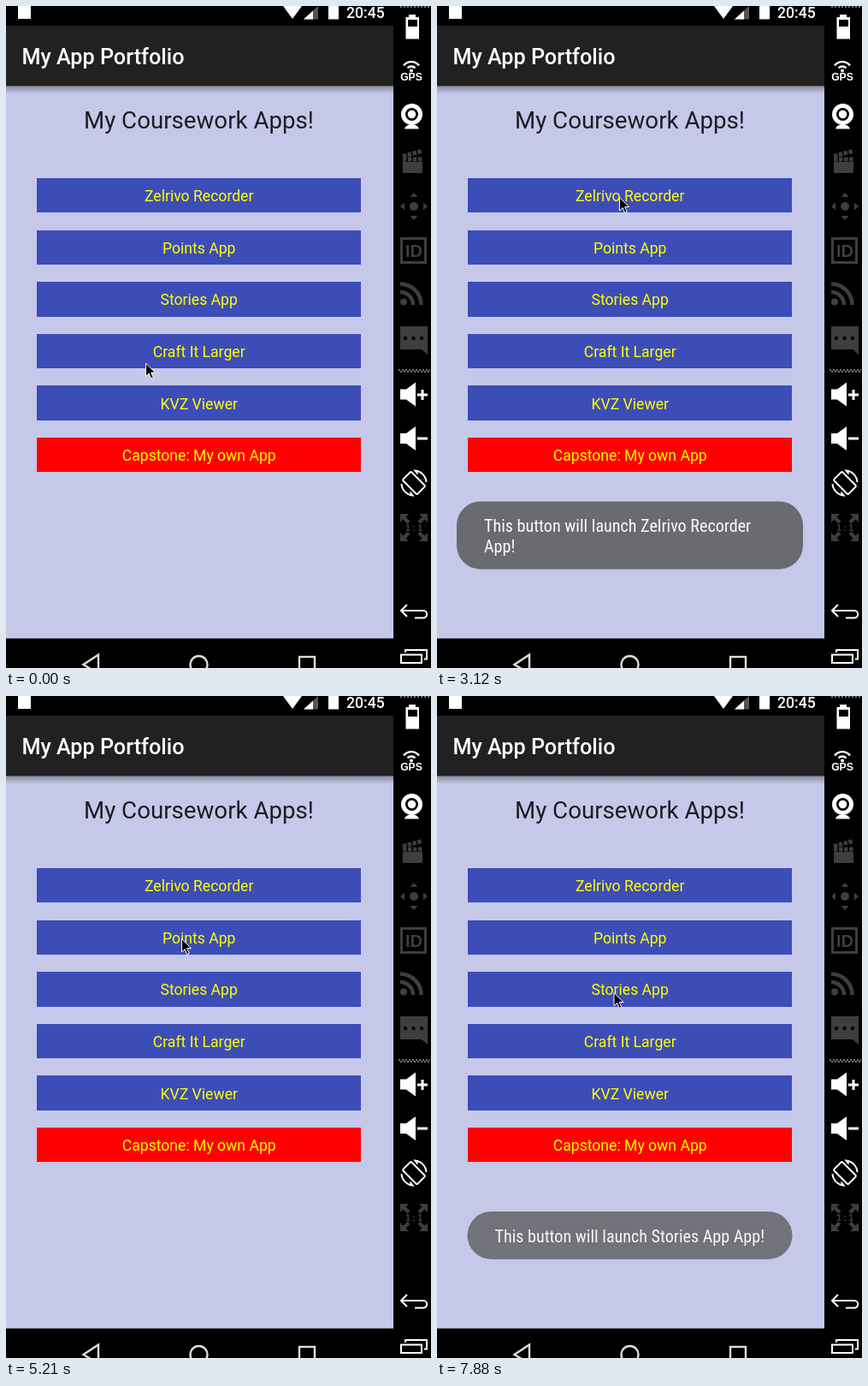
An HTML page that plays this animation: 497 px wide and 773 px high, repeating every 8000 ms.

```html
<!DOCTYPE html>
<html lang="en">
<head>
<meta charset="utf-8">
<title>App portfolio demo</title>
<style>
  html, body { margin: 0; width: 100%; height: 100%; overflow: hidden; background: #000; }
  svg { display: block; font-family: Roboto, sans-serif; }
  .label { font-size: 17.6px; fill: #ff0; text-anchor: middle; }
  .toast rect { fill: #646568; }
  .toast text { font: 20.1px "Roboto Condensed", Roboto, sans-serif; font-stretch: 75%; fill: #fff; }
  .line { fill: none; stroke: #fff; stroke-width: 2.4; }
  .thin { stroke-width: 2; }
  .dim { fill: #3e3e3e; }
  .dimline { fill: none; stroke: #3e3e3e; }
  .bold { font-family: "Liberation Sans", Arial, sans-serif; font-weight: bold; text-anchor: middle; }
</style>
</head>
<body>
<svg width="497" height="773" viewBox="0 0 497 773">
  <defs>
    <linearGradient id="shade" x2="0" y2="1">
      <stop stop-color="#000" stop-opacity=".32"/>
      <stop offset="1" stop-color="#000" stop-opacity="0"/>
    </linearGradient>
    <path id="speaker" d="M461 -6h7l11 -8v28l-11 -8h-7z" fill="#fff"/>
    <path id="corner" d="M-16 -16h10l-3.5 3.5 5 5 -3 3 -5 -5 -3.5 3.5z" class="dim"/>
    <path id="dots" d="M459 0h37M461 2h35" fill="none" stroke="#999" stroke-width="1.6" stroke-dasharray="2 2"/>
  </defs>

  <rect width="497" height="773"/>
  <rect y="93" width="453" height="645.5" fill="#c5c8e9"/>
  <rect y="93" width="453" height="10" fill="url(#shade)"/>
  <rect y="23" width="453" height="70.4" fill="#212121"/>
  <text x="18.5" y="67.5" font-size="25.2" font-weight="500" fill="#fff">My App Portfolio</text>
  <text x="225.5" y="143" font-size="27.7" fill="#1c1d22" text-anchor="middle">My Coursework Apps!</text>

  <!-- status bar -->
  <g fill="#fff">
    <rect x="14" width="15" height="15"/>
    <path d="M324 0h22l-11 15z"/>
    <path d="M348 15.5L365 0v15.5z" fill="#555"/>
    <path d="M348 15.5L359 5.5v10z"/>
    <rect x="377" width="12" height="15.5"/>
    <text x="398" y="14" font-size="17.6" font-weight="500">20:45</text>
  </g>

  <!-- navigation bar -->
  <g class="line" style="stroke:#ddd">
    <path d="M108 757.5v22L90.500 769z"/>
    <circle cx="225.5" cy="769" r="10"/>
    <rect x="343" y="760" width="18" height="18"/>
  </g>

  <g id="buttons"></g>

  <!-- emulator tools -->
  <use href="#dots" y="-1"/>
  <use href="#dots" y="425"/>
  <g fill="#fff">
    <path d="M471 10h8v3h4v25.500h-15.500v-25.500h3.500z"/>
    <path d="M470 16h11v8h-11z" fill="#000"/>
    <circle cx="474" cy="75.5" r="2"/>
    <path class="line" d="M469.500 72.500a6 6 0 0 1 9 0M465 69.500a11.500 11.500 0 0 1 18 0"/>
    <text class="bold" x="474" y="87" font-size="12.2">GPS</text>
    <path d="M466 143.500c1-4 5-5 8.500-5s7.500 1 8.500 5z"/>
    <circle cx="474.5" cy="126.500" r="12.5"/>
    <circle cx="474.5" cy="126.500" r="7.5" fill="#000"/>
    <circle cx="474.5" cy="126.500" r="4.8"/>
  </g>
  <g class="dim">
    <rect x="464" y="182" width="23" height="13"/>
    <path class="dimline" d="M464 179h23M464 175.500l22-6" stroke-width="5" stroke-dasharray="4.500 1.500"/>
    <circle cx="477" cy="234" r="5"/>
    <path d="M477 218l4.500 5h-9zM477 250l4.500-5h-9zM461 234l5-4.500v9zM493 234l-5-4.500v9z"/>
    <rect class="dimline" x="462.5" y="271.500" width="28" height="28" stroke-width="3"/>
    <text class="bold" x="477" y="293" font-size="20">ID</text>
    <circle cx="465" cy="345.5" r="4"/>
    <path class="dimline" d="M461 334a15 15 0 0 1 15 15M461 324.500a24.500 24.500 0 0 1 24.500 24.500" stroke-width="4.5"/>
    <path d="M461 374h32v33l-7-6h-25z"/>
    <path d="M467 388h20" stroke="#000" stroke-width="4.5" stroke-linecap="round" stroke-dasharray="0 9.500"/>
    <text class="bold" x="478" y="613" font-size="11.5" letter-spacing="2">1:1</text>
  </g>
  <g id="corners" transform="translate(477 609)"></g>
  <use href="#speaker" y="453.5"/>
  <use href="#speaker" y="505"/>
  <path class="line" d="M481 454h12M487 448v12M481 505h12" style="stroke-width:3"/>
  <g class="line thin" transform="translate(477 557)">
    <rect x="-7" y="-12" width="14" height="24" rx="1.5" transform="rotate(-45)"/>
    <path d="M-14.500 1a14.500 14.500 0 0 0 13 13.500l-3-4M14.500 -1a14.500 14.500 0 0 0 -13 -13.500l3 4"/>
  </g>
  <path class="line thin" d="M469 699l-7 7 7 7M462 706h26a4.200 4.200 0 0 1 0 8.400h-10"/>
  <path class="line thin" d="M462 757.500h24v9.500h-24zM467 755v-3h25v10.500h-3"/>

  <g id="toasts"></g>
  <path id="cursor" d="M.5 .5v15.500l3.600 -3.500 2.600 6 2.600 -1.100 -2.600 -5.800h4.800z" fill="#000" stroke="#fff" stroke-linejoin="round"/>
</svg>

<script>
const LOOP = 8000, TICK = 148.6;
const $ = id => document.getElementById(id);

const apps = ["Zelrivo Recorder", "Points App", "Stories App", "Craft It Larger", "KVZ Viewer", "Capstone: My own App"];
$("buttons").innerHTML = apps.map((name, i) => {
  const y = 201 + 60.6 * i, top = Math.round(y), bottom = Math.round(y + 40.4);
  return `<rect x="36" y="${top}" width="379" height="${bottom - top}" fill="${i < 5 ? "#3d4db7" : "#f00"}"/>
    <text class="label" x="225.7" y="${y + 27.2}">${name}</text>`;
}).join("");

$("corners").innerHTML = [0, 90, 180, 270].map(a => `<use href="#corner" transform="rotate(${a})"/>`).join("");

// Fade start times are in ticks.
const toasts = [
  { x: 23, y: 578.5, w: 405, lines: [`This button will launch ${apps[0]}`, "App!"], show: 18.4, hide: 32.55 },
  { x: 35.5, y: 602, w: 380, lines: [`This button will launch ${apps[1]} App!`], show: 36.2, hide: 50.55 },
  { x: 35.5, y: 602, w: 380, lines: [`This button will launch ${apps[2]} App!`], show: 50.6, hide: 99 },
];
$("toasts").innerHTML = toasts.map(({ x, y, w, lines }) =>
  `<g class="toast"><rect x="${x}" y="${y}" width="${w}" height="${657.7 - y}" rx="27.8"/>` +
  lines.map((s, i) => `<text x="${x + 32}" y="${y + 35.6 + 24 * i}">${s}</text>`).join("") + "</g>"
).join("");
const toastNodes = [...$("toasts").children];

const ramp = (n, start, length) => Math.min(1, Math.max(0, (n - start) / length));
const smooth = p => p * p * (3 - 2 * p);
const easeOut = p => 1 - (1 - p) ** 1.4;

const moves = [
  { start: 3, length: 8, dx: 50, dy: -193.5, ease: smooth },
  { start: 21, length: 8, dx: -8, dy: 60, ease: easeOut },
  { start: 42, length: 4, dx: 1.5, dy: 63, ease: smooth },
];

function draw() {
  const n = Math.floor((performance.now() % LOOP + 5) / TICK);
  let x = 163, y = 416.5;
  for (const m of moves) {
    const p = m.ease(ramp(n, m.start, m.length));
    x += m.dx * p;
    y += m.dy * p;
  }
  $("cursor").setAttribute("transform", `translate(${x} ${y})`);
  toasts.forEach(({ show, hide }, i) => {
    toastNodes[i].setAttribute("opacity", ramp(n, show, 2.8) * (1 - ramp(n, hide, 2.4)));
  });
  requestAnimationFrame(draw);
}
draw();
</script>
</body>
</html>
```
